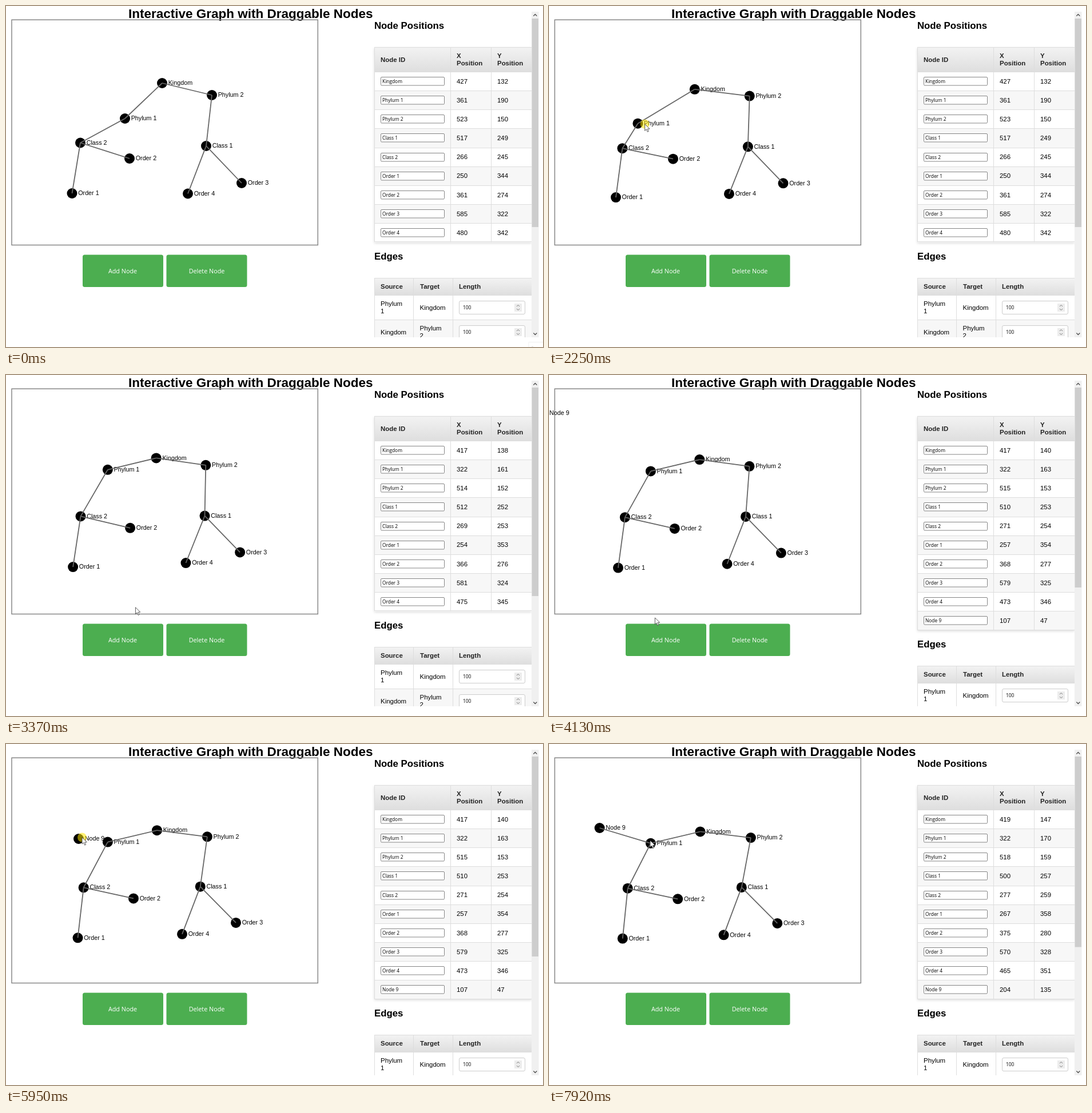
Write an HTML page that moves like this. It is 939 by 597 pixels and loops after 7990 ms.

```html
<!DOCTYPE html>
<html lang="en">
<head>
<meta charset="utf-8">
<title>Interactive Graph with Draggable Nodes</title>
<style>
  html, body { margin: 0; width: 100%; height: 100%; overflow: hidden; background: #fff; }
  svg { display: block; width: 939px; height: 597px; }
  text { font: 11.45px "Liberation Sans", Arial, sans-serif; fill: #000; }
  .title { font-weight: bold; font-size: 22.5px; }
  .head { font-weight: bold; font-size: 16.8px; }
  .th { font-weight: bold; fill: #222; }
  .field { font: 8.4px "Open Sans", "Noto Sans", sans-serif; }
  .btn { font: 10.8px "Open Sans", "Noto Sans", sans-serif; fill: #fff; text-anchor: middle; }
  .label { font-size: 10.75px; }
  .grid { stroke: #ddd; fill: none; }
  .link { stroke: #666; stroke-width: 1.8; }
  .chev { fill: none; stroke: #505050; stroke-width: 1.3; }
</style>
</head>
<body>
<svg viewBox="0 0 939 597">
  <defs>
    <linearGradient id="bar" x2="0" y2="1">
      <stop stop-color="#f3f3f3"/><stop offset="1" stop-color="#dedede"/>
    </linearGradient>
    <filter id="soft" x="-5%" y="-5%" width="110%" height="112%">
      <feDropShadow dx="0" dy="2" stdDeviation="2" flood-opacity=".14"/>
    </filter>
    <clipPath id="panel"><rect x="636" y="10" width="283" height="570"/></clipPath>
  </defs>
  <text class="title" x="214" y="21">Interactive Graph with Draggable Nodes</text>
  <rect x="10" y="24.2" width="535.3" height="394.3" fill="none" stroke="#888" stroke-width="1.5"/>
  <rect id="add" x="134" y="435.5" width="141" height="56.5" rx="3.5"/>
  <rect x="280.5" y="435.5" width="141" height="56.5" rx="3.5" fill="#4cae50"/>
  <text class="btn" x="204" y="468">Add Node</text>
  <text class="btn" x="351" y="468">Delete Node</text>

  <g clip-path="url(#panel)">
    <text class="head" x="644" y="39.7">Node Positions</text>
    <g id="table"></g>
    <g id="edgeTable"></g>
  </g>

  <rect x="919" y="10" width="12.5" height="570" fill="#f0f0f0"/>
  <rect id="thumb" x="919.5" y="22" width="11.5" fill="#cdcdcd"/>
  <path class="chev" d="M922.3 17.5l3-3 3 3M922.3 572.5l3 3 3-3"/>

  <g id="dots"></g>
  <g id="labels"></g>
  <g id="links"></g>

  <g id="corner">
    <path d="M914 597V588.5H939" fill="none" stroke="#f0f0f0"/>
    <path d="M919 596.5h3" stroke="#ddd"/>
  </g>
  <circle id="glow" r="8" fill="#ffe600" opacity=".55"/>
  <path id="cursor" d="M0 0V11.6L2.7 9.1 4.6 13.6 6.6 12.7 4.7 8.4H8.4Z" fill="#fff" stroke="#333" stroke-width=".8"/>
</svg>
<script>
const $ = id => document.getElementById(id);
const LOOP = 7990, STEP = 70;
const GRAB = 1570, RELEASE = 2640, REST = 3370, ADD = 3710, GRAB2 = 4900, DROP = 6430, PICK = 6900, JOIN = 7600;

// name, first place on stage, then listed positions: at first, after the drag, at the end
const nodes = [
  ['Kingdom', [273, 135], [427, 132], [417, 138], [419, 147]],
  ['Phylum 1', [208, 197], [361, 190], [322, 161], [322, 170]],
  ['Phylum 2', [360, 156], [523, 150], [514, 152], [518, 159]],
  ['Class 1', [350, 245], [517, 249], [512, 252], [500, 257]],
  ['Class 2', [130, 239.5], [266, 245], [269, 253], [277, 259]],
  ['Order 1', [115.5, 328], [250, 344], [254, 353], [267, 358]],
  ['Order 2', [216, 267], [361, 274], [366, 276], [375, 280]],
  ['Order 3', [412, 310], [585, 322], [581, 324], [570, 328]],
  ['Order 4', [318, 328.5], [480, 342], [475, 345], [465, 351]],
  ['Node 9']
];
const pairs = [[1, 0], [0, 2], [2, 3], [1, 4], [4, 5], [4, 6], [3, 7], [3, 8], [9, 1]];
// How much the neighbours give way to the dragged node
const give = { 0: [.35, .05], 4: [.08, .08] };

// Key points of the pointer: time, x, y
const mouse = [[260, 912, 596], [720, 420, 330], [1030, 213.5, 229], [1370, 214, 194.5], [GRAB, 214, 194.5],
  [1900, 140, 190], [2250, 167.5, 207], [2560, 184, 163], [2800, 186, 168], [3160, 222, 386],
  [REST, 226.5, 407], [ADD, 206, 455], [4060, 203, 460], [4830, 8.5, 74.5], [5400, 85, 101],
  [5850, 133, 163.5], [5950, 133, 163.5], [6300, 72, 107], [PICK, 76, 137], [JOIN, 177, 169]];
const presses = [[GRAB, RELEASE], [ADD - 40, ADD + 70], [GRAB2, DROP], [PICK - 50, PICK + 60], [JOIN - 50, JOIN + 50]];

const clamp = u => Math.max(0, Math.min(1, u));
const mix = (a, b, u) => a + (b - a) * u;
const mix2 = (p, q, u) => [mix(p[0], q[0], u), mix(p[1], q[1], u)];
const part = (t, a, b) => clamp((t - a) / (b - a));

const toStage = ([x, y]) => [.893 * x - 109.7, .887 * y + 23];
const toList = ([x, y]) => [Math.round((x + 109.7) / .893), Math.round((y - 23) / .887)];

function along(track, t) {
  const i = track.findIndex(k => k[0] > t);
  if (i < 0) return track[track.length - 1].slice(1);
  if (!i) return track[0].slice(1);
  const p = track[i - 1], q = track[i];
  return mix2(p.slice(1), q.slice(1), part(t, p[0], q[0]));
}

// A held node trails the pointer a little
function held(t) {
  const [x, y] = along(mouse, t - 80);
  return [x - 6, y + 2.5];
}

// Drift of the graph without the pull of the drag
function drift(i, t) {
  const [, first, , mid, end] = nodes[i];
  if (t < RELEASE) return mix2(first, toStage(mid), 1 - (1 - part(t, GRAB, RELEASE)) ** 2);
  return mix2(toStage(mid), toStage(end), part(t, REST, JOIN) ** .65);
}

function newNode(t) {
  const end = toStage([204, 135]);
  if (t < GRAB2) return mix2(toStage([107, 47]), [-3, 71.5], part(t, ADD, 4830));
  if (t < DROP) return held(t);
  if (t < JOIN) return mix2(held(DROP), end, part(t, DROP, JOIN));
  return mix2(end, [88.5, 147], part(t, JOIN, 7920));
}

function place(i, t) {
  if (i === 9) return newNode(t);
  const at = drift(i, t);
  if (t < GRAB || t >= RELEASE) return at;
  if (i === 1) return held(t);
  const pull = give[i] || [0, 0], base = drift(1, t), hand = held(t);
  return at.map((v, k) => v + pull[k] * (hand[k] - base[k]));
}

const bursts = [[260, 1030], [1100, 1370], [1570, 2320], [2390, 3160], [3230, 3990],
  [4060, 4830], [4900, 5670], [5740, 6500], [6570, 7340], [7410, 7920]];
function step(t) {
  const burst = bursts.filter(b => b[0] <= t).pop();
  if (!burst) return 0;
  const [a, b] = burst, n = Math.round((b - a) / STEP), gap = (b - a) / n;
  return a + Math.min(n, Math.floor((t - a) / gap + .05)) * gap;
}

const txt = (x, y, s, c = '') => `<text class="${c}" x="${x}" y="${y}">${s}</text>`;
const box = (x, y, w, h, more) => `<rect x="${x}" y="${y}" width="${w}" height="${h}" ${more}/>`;
const rules = (xs, y, h) => xs.map(x => `<path class="grid" d="M${x} ${y}v${h}"/>`).join('');
const line = y => `<path class="grid" d="M644 ${y}H919"/>`;

function nodeTable(event, count) {
  const rowH = 33.15, h = 43 + rowH * count;
  let s = box(644, 72, 275, h, 'fill="#fff" filter="url(#soft)"') + box(644, 72, 275, 43, 'fill="url(#bar)"') +
    txt(655, 97.5, 'Node ID', 'th') + txt(788, 91, 'X', 'th') + txt(788, 104, 'Position', 'th') +
    txt(859, 91, 'Y', 'th') + txt(859, 104, 'Position', 'th') + line(72.5);
  for (let i = 0; i < count; i++) {
    const y = 115 + rowH * i, [vx, vy] = event ? toList(place(i, event)) : nodes[i][2];
    if (i % 2) s += box(644, y, 275, rowH, 'fill="#f7f7f7"');
    s += line(Math.round(y) + .5) + box(655.5, Math.round(y + 9) + .5, 111, 14.5, 'rx="1.5" fill="#fff" stroke="#858585"') +
      txt(658, y + 20, nodes[i][0], 'field') + txt(788, y + 20.6, vx) + txt(859, y + 20.6, vy);
  }
  return s + line(Math.round(72 + h) - .5) + rules([644.5, 777.5, 848.5], 72, h);
}

function edgeTable() {
  const field = y => box(792.5, y + .5, 115, 23, 'rx="2.5" fill="#fff" stroke="#ccc"') +
    txt(799, y + 15.3, '100', 'field') + box(889, y + 5, 13, 14, 'fill="#ececec"') +
    `<path d="M893 ${y + 10}l2.5-2.5 2.5 2.5M893 ${y + 14}l2.5 2.5 2.5-2.5" fill="none" stroke="#777"/>`;
  return txt(644, 443.5, 'Edges', 'head') + box(644, 476, 275, 30.5, 'fill="url(#bar)"') +
    box(644, 549.5, 275, 43, 'fill="#f7f7f7"') +
    txt(655, 495, 'Source', 'th') + txt(724, 495, 'Target', 'th') + txt(792, 495, 'Length', 'th') +
    line(476.5) + line(506.5) + line(549.5) + rules([644.5, 712.5, 781.5], 476, 120) +
    txt(655, 525, 'Phylum') + txt(655, 538, '1') + txt(723.5, 531.7, 'Kingdom') + field(516) +
    txt(655, 574.7, 'Kingdom') + txt(723.5, 568, 'Phylum') + txt(723.5, 581, '2') + field(559);
}

$('edgeTable').innerHTML = edgeTable();
$('dots').innerHTML = nodes.map(() => '<circle r="9"/>').join('');
$('labels').innerHTML = nodes.map(n => txt(0, 0, n[0], 'label')).join('');
$('links').innerHTML = pairs.map(() => '<line class="link"/>').join('');
const dots = [...$('dots').children], labels = [...$('labels').children], links = [...$('links').children];

const set = (el, o) => { for (const k in o) el.setAttribute(k, o[k]); };
const show = (el, on) => { el.style.display = on ? '' : 'none'; };
let shown = -1;

function draw(t) {
  const at = nodes.map((_, i) => place(i, t));
  const hasNode = t >= ADD, joined = t >= JOIN;
  at.forEach(([x, y], i) => {
    set(dots[i], { cx: x, cy: y });
    set(labels[i], { x: x + 10.7, y: y + 3.2 });
  });
  pairs.forEach(([a, b], i) => set(links[i], { x1: at[a][0], y1: at[a][1], x2: at[b][0], y2: at[b][1] }));
  show(dots[9], hasNode);
  show(labels[9], hasNode);
  show(links[8], joined);

  // The lists refresh only at these moments
  const event = [0, RELEASE, ADD, DROP, PICK, JOIN].filter(e => e <= t).pop();
  if (event !== shown) {
    $('table').innerHTML = nodeTable(event, hasNode ? 10 : 9);
    set($('edgeTable'), { transform: `translate(0 ${hasNode ? 33.1 : 0})` });
    set($('thumb'), { height: joined ? 333.5 : hasNode ? 350 : 365 });
    shown = event;
  }

  const [mx, my] = along(mouse, t);
  set($('cursor'), { transform: `translate(${mx} ${my})` });
  set($('glow'), { cx: mx, cy: my });
  show($('glow'), presses.some(([a, b]) => t >= a && t < b));
  show($('cursor'), t >= 260);
  show($('corner'), t < 260);
  const over = mx > 134 && mx < 275 && my > 435.5 && my < 492;
  set($('add'), { fill: over ? '#45a049' : '#4cae50' });
}

const start = performance.now();
function tick() {
  draw(step((performance.now() - start) % LOOP));
  requestAnimationFrame(tick);
}
tick();
</script>
</body>
</html>
```
